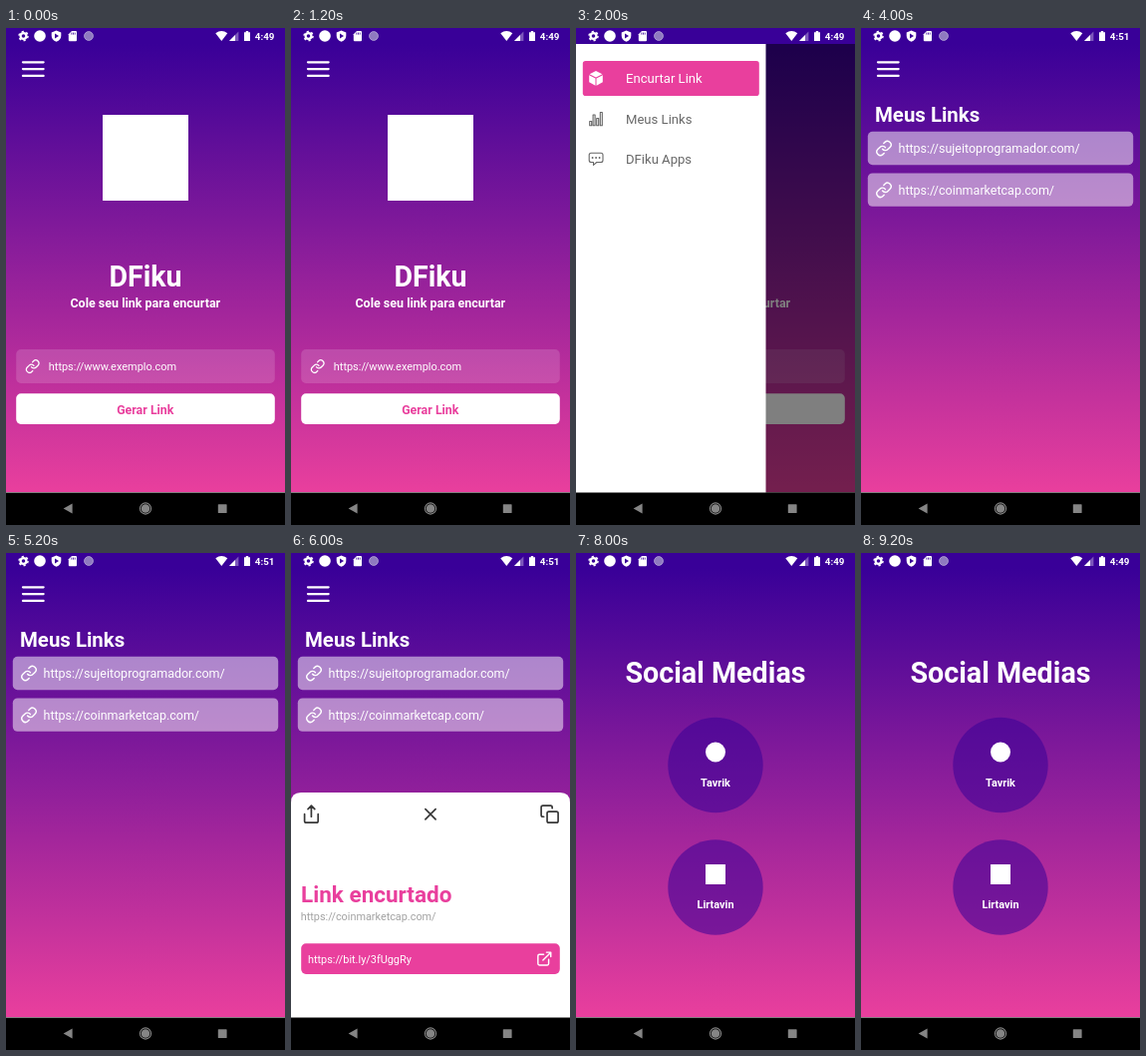
Animation of 280x498 px, one loop 10000 ms. Source, as an HTML page:

```html
<!DOCTYPE html>
<html lang="pt">
<head>
<meta charset="utf-8">
<title>Encurtador de links</title>
<style>
  :root { --pink: #e93f9d; --top: #390098; }
  html, body { margin: 0; width: 100%; height: 100%; overflow: hidden; background: #000; }
  svg.stage { display: block; width: 100%; height: 100%; }
  text { font-family: Roboto, sans-serif; fill: #fff; white-space: pre; }
  .bold { font-weight: 700; }
  .mid { text-anchor: middle; }
  .clock { font-size: 9.8px; font-weight: 700; }
  .line { fill: none; stroke: currentColor; stroke-width: 2; stroke-linecap: round; stroke-linejoin: round; }

  /* Hard cuts: each screen holds for one or two 2 s slots */
  .one, .two { visibility: hidden; animation: one 10s step-end infinite; }
  .two { animation-name: two; }
  .at2 { animation-delay: -8s; }
  .at4 { animation-delay: -6s; }
  .at6 { animation-delay: -4s; }
  .at8 { animation-delay: -2s; }
  @keyframes one { 0% { visibility: visible } 20%, 100% { visibility: hidden } }
  @keyframes two { 0% { visibility: visible } 40%, 100% { visibility: hidden } }
</style>
</head>
<body>
<svg class="stage" viewBox="0 0 280 498" color="#fff">
  <defs>
    <linearGradient id="sky" x1="0" y1="0" x2="0" y2="1">
      <stop offset="0" stop-color="#390098"/>
      <stop offset="1" stop-color="#e93f9d"/>
    </linearGradient>
    <symbol id="link" viewBox="0 0 24 24">
      <path class="line" d="M10 13a5 5 0 0 0 7.54.54l3-3a5 5 0 0 0-7.07-7.07l-1.72 1.71M14 11a5 5 0 0 0-7.54-.54l-3 3a5 5 0 0 0 7.07 7.07l1.71-1.71"/>
    </symbol>
    <symbol id="share" viewBox="0 0 24 24">
      <path class="line" d="M4 12v8a2 2 0 0 0 2 2h12a2 2 0 0 0 2-2v-8M16 6l-4-4-4 4M12 2v13"/>
    </symbol>
    <symbol id="close" viewBox="0 0 24 24">
      <path class="line" d="M18 6L6 18M6 6l12 12"/>
    </symbol>
    <symbol id="copy" viewBox="0 0 24 24">
      <path class="line" d="M11 9h9a2 2 0 0 1 2 2v9a2 2 0 0 1-2 2h-9a2 2 0 0 1-2-2v-9a2 2 0 0 1 2-2zM5 15H4a2 2 0 0 1-2-2V4a2 2 0 0 1 2-2h9a2 2 0 0 1 2 2v1"/>
    </symbol>
    <symbol id="open" viewBox="0 0 24 24">
      <path class="line" d="M18 13v6a2 2 0 0 1-2 2H5a2 2 0 0 1-2-2V8a2 2 0 0 1 2-2h6M15 3h6v6M10 14L21 3"/>
    </symbol>
    <path id="burger" d="M17 34.3h20.6M17 41.1h20.6M17 47.9h20.6" stroke="#fff" stroke-width="2.3" stroke-linecap="round"/>
  </defs>

  <rect width="280" height="17" fill="var(--top)"/>
  <rect y="465" width="280" height="1" fill="#fff"/>
  <rect y="16" width="280" height="449" fill="url(#sky)"/>

  <!-- Home -->
  <g class="two">
    <use href="#burger"/>
    <rect x="97" y="87" width="86" height="86" fill="#fff"/>
    <text class="bold mid" x="140" y="259" font-size="28.6">DFiku</text>
    <text class="bold mid" x="139.8" y="280" font-size="12.5">Cole seu link para encurtar</text>
    <rect x="10.2" y="322" width="259.6" height="34" rx="4.8" fill="#fff" fill-opacity=".15"/>
    <use href="#link" x="19.2" y="331.6" width="15" height="15"/>
    <text x="42.8" y="343" font-size="10.95">https://www.exemplo.com</text>
    <rect x="10.2" y="366.3" width="259.6" height="30.6" rx="4.8" fill="#fff"/>
    <text class="bold mid" x="139.8" y="386.5" font-size="12.4" style="fill: var(--pink)">Gerar Link</text>
    <text class="clock" x="249.8" y="12">4:49</text>
  </g>

  <!-- Drawer -->
  <g class="one at2">
    <rect y="16" width="280" height="450" fill-opacity=".5"/>
    <rect y="16" width="190.5" height="450" fill="#fff"/>
    <rect x="6.8" y="33" width="177" height="35" rx="2.8" fill="var(--pink)"/>
    <g fill="#fff">
      <path d="M20 43l6.4 3.2L20 49.5l-6.4-3.3z"/>
      <path d="M13.2 47.3l6.3 3.2v7.2l-6.3-3.4z"/>
      <path d="M26.8 47.3l-6.3 3.2v7.2l6.3-3.4z"/>
    </g>
    <g fill="none" stroke="#666" stroke-width="1.1" stroke-linejoin="round">
      <path d="M13.7 93.5h2v4.2h-2zM17.1 87h2v10.7h-2zM20.7 90.5h2v7.2h-2zM24.3 84.5h2v13.2h-2z"/>
      <path d="M15.2 125.3h9.8q2 0 2 2v5.2q0 2-2 2h-4.2l-3.3 2.9v-2.9h-2.3q-2 0-2-2v-5.2q0-2 2-2z"/>
      <path d="M16.6 130h.02M20.1 130h.02M23.6 130h.02" stroke-width="1.9" stroke-linecap="round"/>
    </g>
    <text x="50" y="55.2" font-size="13.1">Encurtar Link</text>
    <text x="50" y="95.7" font-size="13.1" style="fill: #686868">Meus Links</text>
    <text x="50" y="136.3" font-size="13.1" style="fill: #686868">DFiku Apps</text>
  </g>

  <!-- Saved links -->
  <g class="two at4">
    <use href="#burger"/>
    <text class="bold" x="14" y="94.3" font-size="20.4">Meus Links</text>
    <g fill="#fff" fill-opacity=".5">
      <rect x="6.8" y="103.8" width="266.4" height="33.4" rx="4.8"/>
      <rect x="6.8" y="145.4" width="266.4" height="33.4" rx="4.8"/>
    </g>
    <use href="#link" x="14.4" y="111.9" width="17.2" height="17.2"/>
    <use href="#link" x="14.4" y="153.7" width="17.2" height="17.2"/>
    <text x="37.5" y="125.4" font-size="12.5">https://sujeitoprogramador.com/</text>
    <text x="37.5" y="167.3" font-size="12.5">https://coinmarketcap.com/</text>
    <text class="clock" x="249.8" y="12">4:51</text>
  </g>

  <!-- Short link sheet -->
  <g class="one at6">
    <path d="M0 466V250q0-10 10-10h260q10 0 10 10v216z" fill="#fff"/>
    <g color="#383838">
      <use href="#share" x="10.2" y="251.5" width="20.4" height="20.4"/>
      <use href="#close" x="129.8" y="251.5" width="20.4" height="20.4"/>
      <use href="#copy" x="249.4" y="251.5" width="20.4" height="20.4"/>
    </g>
    <text class="bold" x="10.1" y="350" font-size="22.5" style="fill: var(--pink)">Link encurtado</text>
    <text x="9.8" y="367.6" font-size="10.85" style="fill: #a2a2a2">https://coinmarketcap.com/</text>
    <rect x="10.2" y="391.3" width="259.6" height="30.6" rx="4.8" fill="var(--pink)"/>
    <text x="17" y="411" font-size="10.9">https://bit.ly/3fUggRy</text>
    <use href="#open" x="245.7" y="398" width="17.2" height="17.2"/>
  </g>

  <!-- Social -->
  <g class="one at8">
    <text class="bold mid" x="140" y="129.5" font-size="28.7">Social Medias</text>
    <g fill="var(--top)" fill-opacity=".55">
      <circle cx="140" cy="212.5" r="47.7"/>
      <circle cx="140" cy="335" r="47.7"/>
    </g>
    <circle cx="140" cy="199.5" r="10" fill="#fff"/>
    <rect x="130" y="312" width="20" height="20" fill="#fff"/>
    <text class="bold mid" x="140" y="233.7" font-size="10.9">Tavrik</text>
    <text class="bold mid" x="140" y="356.2" font-size="10.9">Lirtavin</text>
    <text class="clock" x="249.8" y="12">4:49</text>
  </g>

  <!-- Status bar -->
  <g fill="#fff">
    <circle cx="17.5" cy="8" r="2.9" fill="none" stroke="#fff" stroke-width="2.2"/>
    <circle cx="17.5" cy="8" r="4.5" fill="none" stroke="#fff" stroke-width="1.5" stroke-dasharray="2.2 2.512"/>
    <circle cx="34" cy="8" r="5.8"/>
    <path d="M50.5 2.5l4.8 1.9v3.4q0 4.2-4.8 6-4.8-1.8-4.8-6V4.4z"/>
    <path d="M49 5.6l4 2.5-4 2.5z" fill="var(--top)"/>
    <path d="M66 3h4q1 0 1 1v8.2q0 1-1 1h-6.2q-1 0-1-1V6.2z"/>
    <path d="M65.8 4.6v2M67.5 4.6v2M69.2 4.6v2" stroke="#390098" stroke-width=".8"/>
    <circle cx="83" cy="8" r="4.6" fill="#8f7ac0"/>
    <circle cx="83" cy="8" r="4.4" fill="none" stroke="#b3a3d6" stroke-width=".8"/>
    <path d="M210.3 5.2q6-4.4 12 0l-6 7.8z"/>
    <path d="M224 13l9.4-9.4V13z" fill-opacity=".35"/>
    <path d="M224 13l6-6v6z"/>
    <path d="M240.8 3h2.4v1.2h1.8V13h-6V4.2h1.8z"/>
  </g>

  <!-- Navigation bar -->
  <rect y="465.5" width="280" height="33"/>
  <g fill="#858585">
    <path d="M57.6 481.5l9-5.1v10.2z"/>
    <circle cx="140" cy="481.5" r="4.3"/>
    <circle cx="140" cy="481.5" r="5.6" fill="none" stroke="#858585" stroke-width="1.1"/>
    <rect x="212.8" y="477.2" width="8.8" height="8.8" rx=".6"/>
  </g>
</svg>
</body>
</html>
```
